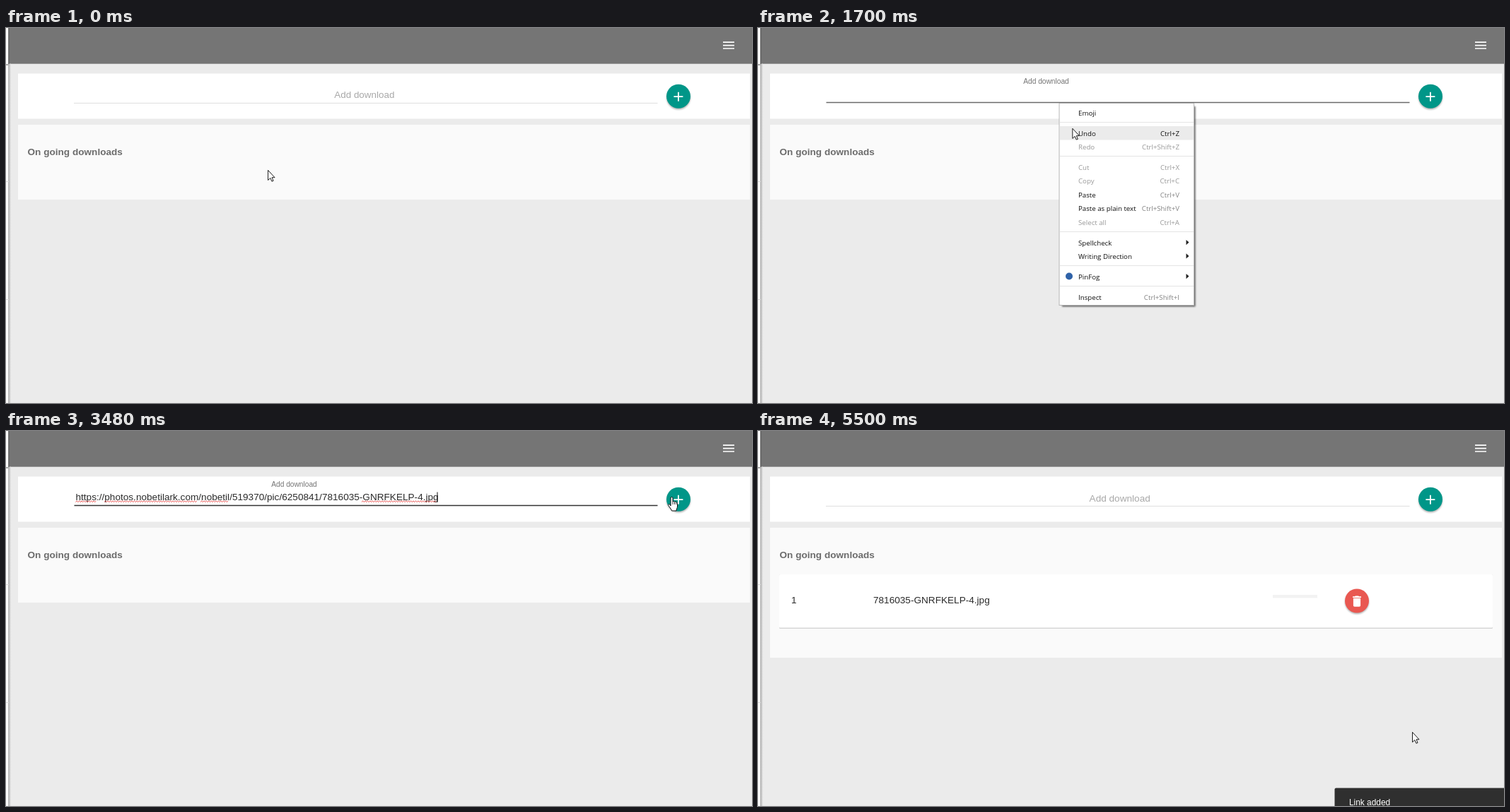
Recreate the animation shown at these times as an HTML page. Size 1055 by 531 pixels, loop 5580 ms.

```html
<!DOCTYPE html>
<html lang="en">
<head>
<meta charset="utf-8">
<title>Download manager</title>
<style>
  html, body { margin: 0; width: 100%; height: 100%; overflow: hidden; background: #ebebeb; }
  svg { display: block; width: 100vw; height: 100vh; }
  text { font: 13.6px "Liberation Sans", Arial, sans-serif; fill: #2b2b2b; white-space: pre; }
  .title { font-weight: bold; fill: #6c6c6c; }
  .toast { font-size: 11.9px; fill: #fff; }
  #menu text { font: 9.7px "Open Sans", "Noto Sans", sans-serif; fill: #111; }
  #menu .key { text-anchor: end; fill: #858585; }
  #menu .off text { fill: #999; }
  #menu .hot .key { fill: #111; }
  #menu .bar { fill: none; }
  #menu .hot .bar { fill: #ebebeb; }
</style>
</head>
<body>
<svg viewBox="0 0 1055 531">
  <defs>
    <linearGradient id="edge">
      <stop offset="0" stop-color="#a2a2a2"/>
      <stop offset="1" stop-color="#ebebeb"/>
    </linearGradient>
    <filter id="soft" x="-20%" y="-20%" width="140%" height="140%"><feGaussianBlur stdDeviation="1.3"/></filter>
    <clipPath id="disc"><circle cx="951" cy="96.7" r="17"/></clipPath>
  </defs>

  <rect width="1055" height="531" fill="#ebebeb"/>
  <rect x="4" width="1051" height="50.7" fill="#757575"/>
  <rect x="3" y="50.7" width="4" height="481" fill="url(#edge)"/>
  <rect width="3.2" height="531" fill="#fbfbfb"/>
  <rect x="3.2" width="1.4" height="51" fill="#5c5c5c"/>
  <path d="M0 52H3.5" stroke="#aaa" stroke-width="2"/>
  <path d="M0 217.5H4M0 384.5H4" stroke="#dcdcdc"/>
  <path d="M1014 20.2H1030M1014 24.6H1030M1014 29H1030" stroke="#fff" stroke-width="1.7"/>

  <rect x="17" y="64.5" width="1035" height="64" fill="#fff"/>
  <rect id="panel" x="17" y="137" width="1035" fill="#fafafa"/>
  <text class="title" x="30.5" y="180">On going downloads</text>

  <path id="line"/>
  <text id="label">Add download</text>
  <g id="url">
    <text x="98.5" y="98">https://photos.nobetilark.com/nobetil/519370/pic/6250841/7816035-GNRFKELP-4.jpg</text>
    <path id="squiggle" fill="none" stroke="#e53935" stroke-width=".9"/>
  </g>
  <path id="caret" stroke="#111"/>

  <circle cx="951" cy="98.5" r="17" opacity=".3" filter="url(#soft)"/>
  <circle id="add" cx="951" cy="96.7" r="17"/>
  <circle id="ripple" cx="941" cy="97" fill="#fff" clip-path="url(#disc)"/>
  <path d="M944.4 97.2H957.4M950.9 90.7V103.7" stroke="#fff" stroke-width="1.8"/>

  <g id="row">
    <rect x="30" y="203" width="1009" height="77" rx="1.5" fill="#d6d6d6"/>
    <rect x="30" y="203" width="1009" height="75.6" rx="1.5" fill="#fff"/>
    <text x="47" y="244">1</text>
    <text x="163" y="244">7816035-GNRFKELP-4.jpg</text>
    <rect x="728" y="232" width="63" height="4.4" fill="#f2f2f2"/>
    <circle cx="847" cy="242.3" r="17" opacity=".3" filter="url(#soft)"/>
    <circle cx="847" cy="240.5" r="17" fill="#e95851"/>
    <path transform="translate(836.8 230.9) scale(.85)" fill="#fff"
      d="M6 19c0 1.1.9 2 2 2h8c1.1 0 2-.9 2-2V7H6zM19 4h-3.5l-1-1h-5l-1 1H5v2h14z"/>
  </g>

  <g id="toast">
    <rect x="815.5" width="250" height="50" rx="2" fill="#2f2f2f"/>
    <text class="toast" x="836" y="24.5">Link added</text>
  </g>

  <g id="menu"></g>

  <circle id="click" r="10" fill="#f8f45c" opacity=".9"/>
  <path id="arrow" d="M.5 .5V14.6L3.8 11.6 5.9 16.3 8 15.4 6 10.8H10Z" fill="#fff" stroke="#111" stroke-width=".95"/>
  <path id="beam" d="M-3 -8.5H-1L0 -7.5 1 -8.5H3M0 -7.5V7.5M-3 8.5H-1L0 7.5 1 8.5H3" fill="none" stroke="#111"/>
  <g id="hand" stroke="#111" fill="#fff" stroke-width="1">
    <path d="M4 13V2a1.5 1.5 0 0 1 3 0V7.2a1.4 1.4 0 0 1 2.5 .4a1.3 1.3 0 0 1 2.3 .7a1.1 1.1 0 0 1 1.7 1V14c0 2-1.5 3-1.5 6H5.5C5 17.5 1.5 14 .7 12.2C.2 10.6 1.8 10 2.7 11Z"/>
    <path d="M7 7V11M9.5 8V11M11.8 9V11" fill="none" stroke-width=".8"/>
  </g>
</svg>
<script>
const LOOP = 5580;
const FOCUS = 920, MENU = 1570, PASTE = 2410, HOVER = 3630, BLUR = 3960, ADDED = 4270, LEAVE = 5270;

const el = {};
document.querySelectorAll('svg [id]').forEach(n => el[n.id] = n);

const set = (n, attrs) => { for (const k in attrs) n.setAttribute(k, attrs[k]); };
const show = (n, on) => n.setAttribute('visibility', on ? 'visible' : 'hidden');
const at = (n, x, y) => n.setAttribute('transform', `translate(${x} ${y})`);
const mix = (a, b, p) => a + (b - a) * p;
const clamp = v => Math.max(0, Math.min(1, v));
const within = (t, a, b) => t >= a && t < b;

// cubic-bezier(.25, .8, .25, 1)
function ease(x) {
  if (x <= 0) return 0;
  if (x >= 1) return 1;
  let lo = 0, hi = 1;
  for (let i = 0; i < 20; i++) {
    const s = (lo + hi) / 2;
    if (.75 * s * (1 - s) + s ** 3 < x) lo = s; else hi = s;
  }
  return 2.4 * lo * (1 - lo) ** 2 + 3 * lo * lo * (1 - lo) + lo ** 3;
}

// Pointer stops: time, x, y
const pointer = [
  [0, 370, 201], [80, 376, 192], [310, 426, 106], [MENU, 426, 106], [2020, 489, 229],
  [2110, 489, 231], [2600, 489, 231], [2640, 505, 224], [2940, 775, 140], [3170, 917, 108],
  [3330, 938, 94], [5150, 938, 94], [5200, 930, 135], [5280, 910, 225], [5360, 906, 305],
  [5430, 913, 375], [5500, 925, 426]
];

function pointerAt(t) {
  const i = pointer.findIndex(k => k[0] > t);
  if (i < 0) return pointer[pointer.length - 1].slice(1);
  const [a, b] = [pointer[i - 1], pointer[i]];
  const p = (t - a[0]) / (b[0] - a[0]);
  return [mix(a[1], b[1], p), mix(a[2], b[2], p)];
}

// Menu entries: label, middle y, shortcut, disabled, submenu
const items = [
  ['Emoji', 120], ['Undo', 149, 'Ctrl+Z'], ['Redo', 168.3, 'Ctrl+Shift+Z', 1],
  ['Cut', 197, 'Ctrl+X', 1], ['Copy', 216.5, 'Ctrl+C', 1], ['Paste', 236, 'Ctrl+V'],
  ['Paste as plain text', 255.5, 'Ctrl+Shift+V'], ['Select all', 275, 'Ctrl+A', 1],
  ['Spellcheck', 304, '', 0, 1], ['Writing Direction', 323.3, '', 0, 1],
  ['PinFog', 352, '', 0, 1], ['Inspect', 381, 'Ctrl+Shift+I']
];

el.menu.innerHTML =
  '<rect x="430" y="111" width="188.5" height="283.5" opacity=".6" filter="url(#soft)"/>' +
  '<rect x="426" y="106.5" width="190.5" height="286" fill="#fff" stroke="#b5b5b5"/>' +
  items.map(([name, y, key = '', off, sub]) =>
    `<g class="item${off ? ' off' : ''}"><rect class="bar" x="427" y="${y - 10}" width="189" height="19.5"/>` +
    `<text x="453" y="${y + 3.6}">${name}</text><text class="key" x="596" y="${y + 3.6}">${key}</text>` +
    (sub ? `<path d="M605.5 ${y - 4}l4 3.6-4 3.6z" fill="#222"/>` : '') + '</g>').join('') +
  [133.5, 181.5, 288.5, 336.5, 365.5].map(y => `<path d="M427 ${y}H616" stroke="#e4e4e4"/>`).join('') +
  '<circle cx="440" cy="351.5" r="5" fill="#2f62a8"/>';
const rows = [...el.menu.querySelectorAll('.item')];

const wave = (a, b) => {
  let d = `M${a} 100.6`;
  for (let x = a + 1.7, i = 0; x <= b; x += 1.7, i++) d += `L${x.toFixed(1)} ${i % 2 ? 100.6 : 99}`;
  return d;
};
el.squiggle.setAttribute('d', [[98.5, 128], [139, 271], [275, 315], [503, 609]].map(r => wave(...r)).join(''));

function drawField(t) {
  const focused = within(t, FOCUS, BLUR);
  const menu = within(t, MENU, PASTE);
  const rest = t < FOCUS ? ease((t + 220) / 400)
    : t < ADDED ? 1 - ease((t - 900) / 400)
    : ease((t - 4220) / 400);
  set(el.label, {
    transform: `translate(${mix(375.2, 468.6, rest)} ${mix(79, 99.8, rest)}) scale(${mix(.75, 1, rest)})`,
    style: `fill:${focused ? '#757575' : within(t, BLUR, ADDED) ? '#999' : '#a8a8a8'}`
  });
  set(el.line, focused
    ? { d: 'M96.5 105.5H921.5', stroke: menu ? '#6a6a6a' : '#333', 'stroke-width': 1.5 }
    : { d: 'M96 106.4H921.5', stroke: '#dedede', 'stroke-width': 1 });

  show(el.url, within(t, PASTE, ADDED));
  show(el.squiggle, within(t, PASTE, BLUR));
  el.caret.setAttribute('d', t < PASTE ? 'M98.5 87V101.5' : 'M610 86.5V101');
  show(el.caret, within(t, FOCUS, MENU) || within(t, PASTE, 2910) || within(t, 3480, BLUR));
}

function drawList(t) {
  const added = t >= ADDED;
  el.panel.setAttribute('height', added ? 184 : 106);
  show(el.row, added);
  const p = ease((t - 4220) / 400);
  show(el.toast, added);
  at(el.toast, 0, 505.5 + 36 * (1 - p));
  el.toast.setAttribute('opacity', p);
}

function drawButton(t) {
  el.add.setAttribute('fill', within(t, HOVER, LEAVE) ? '#0bbfa8' : '#009688');
  set(el.ripple, {
    r: 16 * clamp((t - BLUR) / 150) + 18 * clamp((t - 4110) / 200),
    opacity: within(t, BLUR, 4420) ? .1 * clamp((4420 - t) / 200) : 0
  });
}

function drawPointer(t) {
  const [x, y] = pointerAt(t);
  const beam = within(t, 310, 1490), hand = within(t, 3480, 5170);
  show(el.beam, beam);
  show(el.hand, hand);
  show(el.arrow, !beam && !hand);
  at(el.arrow, x, y);
  at(el.beam, x + .5, y + 1);
  at(el.hand, 936, 93);

  const onButton = within(t, BLUR, 4040);
  show(el.click, within(t, FOCUS, 1080) || within(t, 2260, PASTE) || onButton);
  if (onButton) at(el.click, 941, 97); else at(el.click, x, y - .3);

  show(el.menu, within(t, MENU, PASTE));
  items.forEach(([, mid, , off], i) => rows[i].classList.toggle('hot', !off && within(y, mid - 10, mid + 9.5)));
}

function draw(t) {
  drawField(t);
  drawList(t);
  drawButton(t);
  drawPointer(t);
}

const start = performance.now();
function tick() {
  draw((performance.now() - start) % LOOP);
  requestAnimationFrame(tick);
}
draw(0);
requestAnimationFrame(tick);
</script>
</body>
</html>
```
